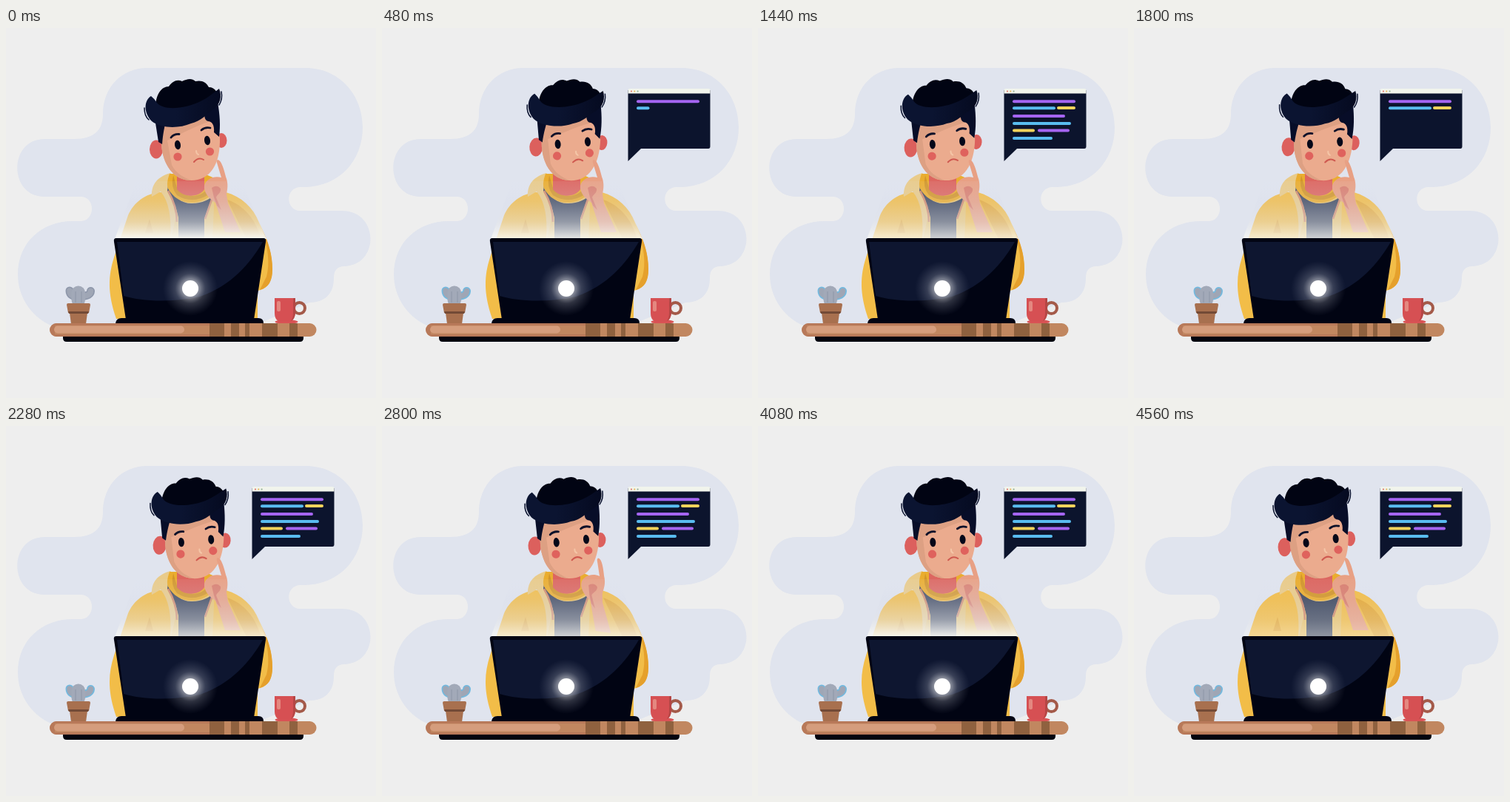
Recreate the animation shown at these times as an HTML page. Size 500 by 500 pixels, loop 4800 ms.

```html
<!DOCTYPE html>
<html lang="en">
<head>
<meta charset="utf-8">
<title>Thinking at the laptop</title>
<style>
  html, body { margin: 0; width: 100%; height: 100%; overflow: hidden; background: #eee; }
  svg { display: block; width: 100vw; height: 100vh; }
</style>
</head>
<body>
<svg viewBox="0 0 500 500">
  <defs>
    <linearGradient id="beamFill" x1="0" y1="0" x2="0" y2="1">
      <stop offset="0" stop-color="#e0e6f4" stop-opacity=".08"/>
      <stop offset=".35" stop-color="#d8dcea" stop-opacity=".26"/>
      <stop offset=".7" stop-color="#e4e6ea" stop-opacity=".56"/>
      <stop offset="1" stop-color="#fafaf6" stop-opacity=".98"/>
    </linearGradient>
    <radialGradient id="haloFill">
      <stop offset=".25" stop-color="#fff" stop-opacity=".62"/>
      <stop offset=".55" stop-color="#c6cad6" stop-opacity=".24"/>
      <stop offset="1" stop-color="#8f96ad" stop-opacity="0"/>
    </radialGradient>
    <linearGradient id="quiffFill">
      <stop offset=".4" stop-color="#0b1431"/>
      <stop offset="1" stop-color="#050a20"/>
    </linearGradient>
    <path id="face" d="M207 128L210 158C212 184 226 206 250 206C276 206 290 184 289 148L282 104L215 116Z"/>
    <clipPath id="faceClip"><use href="#face"/></clipPath>
    <path id="branches" d="M86 355Q86 363 98 363M114.500 355.500Q114 363 98 363"/>
  </defs>

  <rect width="500" height="500" fill="#eee"/>
  <path fill="#e0e4ee" d="M190 54H405C450 54 482 90 482 134C482 180 450 214 404 215H398C377 215 377 247 398 247H454C505 247 505 322 456 322C447 323 443 328 443 338C443 360 430 371 410 371L330 404H66C38 394 16 367 16 333C16 290 48 261 90 261H101C121 260 121 228 101 228H52C3 228 3 150 52 150H92C119 150 131 138 131 116C131 80 157 54 190 54Z"/>

  <!-- jacket, neck and shirt -->
  <path fill="#f2bd48" d="M205 222C184 226 170 239 164 256L146 310C138 335 137 358 149 393H340V355C353 353 360 342 360 326C360 305 353 285 342 263C334 242 318 228 297 222Z"/>
  <path fill="#e5a02c" d="M346 273C354 296 357 318 352 336L343 354C355 351 360 342 360 326C360 307 355 289 346 273Z"/>
  <path fill="#e5a937" d="M194 258L188 277H199ZM299 232L325 285H345C337 258 322 240 299 232Z"/>
  <path fill="#e9cb8a" d="M197 228C196 211 205 201 222 196L232 206L221 222L232 256V285H222Q225 240 209 221Z"/>
  <path fill="#e9c46f" d="M222 216L282 222L279 285H223L230 254Z"/>
  <path fill="#3f4960" d="M219 213C226 230 240 238 252 237C265 237 276 231 279 227L268 258V285H233V256Q229 236 218 220Z"/>
  <path fill="none" stroke="#d08a6c" stroke-width="2.600" d="M219 220Q231 241 231 262M278 232L269 258"/>
  <path fill="#eaad2f" d="M221 197C218 205 217 213 219 217C226 230 239 237 253 236C265 235 276 229 280 222L282 203L268 197Z"/>
  <path fill="#d2962b" d="M226 199L231 216C240 229 259 231 271 219L274 225Q252 239 231 226Q222 215 226 199Z"/>
  <path fill="#dc6660" d="M231 196H268V218C261 229 240 230 231 218Z"/>

  <g id="head">
    <ellipse cx="203" cy="164" rx="9" ry="12.500" fill="#dc605d"/>
    <ellipse cx="291" cy="152" rx="7.500" ry="10" fill="#dc605d"/>
    <use href="#face" fill="#ebab8e"/>
    <path clip-path="url(#faceClip)" fill="#dda083" d="M205 115H290V122C260 129 238 143 218 152L224 185C230 197 240 202 251 206L220 210L205 180Z"/>
    <path fill="#070d28" d="M201 122H217C214 134 212 143 211 157L206 154ZM268 116L286 100C289 117 290 132 288 147L281 141C282 131 278 126 273 126Q268 125 268 116Z"/>
    <path fill="#010413" d="M202 108C202 90 210 79 220 79C225 72 231 69 238 72C244 69 251 67 256 72C264 70 271 73 274 80C283 80 288 88 286 100L263 114L215 119Z"/>
    <path fill="url(#quiffFill)" d="M196 92C187 97 185 114 197 126C210 136 234 136 250 129C264 126 271 116 280 110C290 103 292 92 288 82C280 88 273 94 265 98C240 111 211 111 204 101Q200 95 196 92Z"/>
    <path fill="none" stroke="#09112d" stroke-width="1.500" stroke-linecap="round" d="M187 108Q187 119 193 124M291 86Q293 96 288 104"/>
    <g fill="#040819">
      <ellipse class="eye" cx="232" cy="158" rx="4" ry="6.2" transform="rotate(-8 232 158)"/>
      <ellipse class="eye" cx="272" cy="152" rx="4" ry="6.2" transform="rotate(-8 272 152)"/>
    </g>
    <g fill="none" stroke="#0a1029" stroke-width="2.800" stroke-linecap="round">
      <path d="M223 148Q227 143 234 143.500"/>
      <path d="M264 138Q269 133.500 276 135"/>
    </g>
    <circle cx="232" cy="174" r="5.6" fill="#df625d"/>
    <circle cx="275.5" cy="167" r="5.6" fill="#df625d"/>
    <path fill="none" stroke="#f4c5a7" stroke-width="2" stroke-linecap="round" d="M257 166Q257 170 260 171"/>
    <path fill="none" stroke="#cf5950" stroke-width="2" stroke-linecap="round" d="M254 181Q260 174 267 178"/>
  </g>

  <g id="hand">
    <path fill="#e8a084" d="M286 178C291 179 294 189 297 201C301 211 299 218 298 225L300 237L317 276H296L283 236C273 230 267 221 268 213C270 204 281 199 291 202L285 182Q284 179 286 178Z"/>
    <path fill="#d97f70" d="M278 216Q285 211 290 217C291 223 285 225 284 229L291 246L285 240L281 229Z"/>
  </g>
  <path id="beam" fill="url(#beamFill)" d="M176 207H318L352 285H147Z"/>

  <!-- laptop -->
  <path fill="#010413" d="M149 284H348Q352 284 351 289L335 394H162L146 289Q145 284 149 284Z"/>
  <path fill="#0e1630" d="M150 289H347C330 318 305 348 262 363C224 371 185 370 159 362Z"/>
  <path fill="#010413" d="M148 399Q149 392 156 392H341Q348 392 348 399Z"/>
  <circle id="halo" cx="249" cy="352" r="37" fill="url(#haloFill)"/>
  <circle cx="249" cy="352" r="11" fill="#fff"/>

  <!-- plant -->
  <g fill="none" stroke-linecap="round">
    <use id="arms" href="#branches" stroke-width="11"/>
    <use href="#branches" stroke="#9fa6b5" stroke-width="7.500"/>
  </g>
  <rect x="88.500" y="348.500" width="18.500" height="28" rx="9" fill="#a2a9b8"/>
  <path stroke="#8d95a7" stroke-width="1" d="M94 356V371M102 356V371"/>
  <path fill="#a8704f" d="M84 372H112Q114 372 114 374L112 385H110L108 400H88L86 385H84L82 374Q82 372 84 372Z"/>
  <path fill="#734a36" d="M84 383H112L111 386H85Z"/>

  <!-- mug -->
  <circle cx="396.500" cy="378.500" r="7.500" fill="none" stroke="#a45a49" stroke-width="4"/>
  <ellipse cx="379" cy="397" rx="15.500" ry="3" fill="#d95355"/>
  <path fill="#d65053" d="M363 365H391V385Q390 397 381 397H373Q363 397 363 385Z"/>
  <path fill="#b54645" d="M388 365H391V385Q390 394 385 396Q388 392 388 385Z"/>
  <rect x="366" y="369" width="5" height="14" rx="2" fill="#e48880"/>

  <!-- desk -->
  <path fill="#02040f" d="M77 415H402V419Q402 424 397 424H82Q77 424 77 419Z"/>
  <rect x="59.500" y="399" width="360" height="18" rx="9" fill="#c18760"/>
  <path fill="#b87959" d="M68 399H275V402H66V414H275V417H68A9 9 0 0 1 68 399Z"/>
  <rect x="65" y="402.500" width="176" height="10" rx="5" fill="#d59d7d"/>
  <path fill="#8f613f" d="M275 399H295V417H275ZM304 399H315V417H304ZM323 399H329V417H323ZM346 399H367V417H346ZM383 399H394V417H383Z"/>

  <g id="bubble">
    <path fill="#0c142d" d="M332.500 84H443.500V160Q443.500 163 441 163H350L332.500 180Z"/>
    <path fill="#f1f4ec" d="M332.500 88.500V84Q332.500 82 335 82H441Q443.500 82 443.500 84V88.500Z"/>
    <circle cx="337" cy="85.500" r="1.100" fill="#e0776b"/>
    <circle cx="341.300" cy="85.500" r="1.100" fill="#e7b552"/>
    <circle cx="345.600" cy="85.500" r="1.100" fill="#8fae92"/>
    <g id="code" stroke-width="4" stroke-linecap="round"></g>
  </g>
</svg>
<script>
const LOOP = 4800, STEP = 40, LAST = 4560, TYPE_MS = 80;
const $ = id => document.getElementById(id);
const clamp = v => Math.max(0, Math.min(1, v));

const PURPLE = '#a565f2', BLUE = '#59bcf0', YELLOW = '#f3d35b';
const strokes = [
  [346, 427, 99.3, PURPLE],
  [346, 400, 108.3, BLUE], [406, 427, 108, YELLOW],
  [346, 413, 119, PURPLE],
  [346, 421, 129, BLUE],
  [346, 372, 138.5, YELLOW], [380, 419, 138.5, PURPLE],
  [346, 396, 149, BLUE]
].map(([x1, x2, y, color]) => {
  const el = document.createElementNS('http://www.w3.org/2000/svg', 'line');
  const attrs = { x1, x2, y1: y, y2: y, stroke: color };
  for (const k in attrs) el.setAttribute(k, attrs[k]);
  $('code').append(el);
  return { el, x1, x2 };
});
const eyes = [...document.querySelectorAll('.eye')];

const tilt = [[0, 0], [420, 4], [1000, .7], [1800, 4.1], [2800, 2.6], [3440, 3], [4080, 3], [4560, .4]];
const light = [[0, 1], [1040, .8], [1800, .8], [2800, .8], [3440, .9], [4080, .97], [4560, .45]];
const typing = [380, 1560, 3440];
const taps = [1040, 2800];

// Cosine-eased value between keyed poses.
function ease(keys, t) {
  const i = keys.findIndex(k => k[0] > t);
  if (i < 0) return keys[keys.length - 1][1];
  const [t0, a] = keys[i - 1], [t1, b] = keys[i];
  return a + (b - a) * (1 - Math.cos(Math.PI * (t - t0) / (t1 - t0))) / 2;
}

function bump(t, center, half) {
  const d = Math.abs(t - center) / half;
  return d < 1 ? (1 + Math.cos(Math.PI * d)) / 2 : 0;
}

function backOut(p) {
  const s = .95, q = p - 1;
  return 1 + (s + 1) * q * q * q + s * q * q;
}

function draw(ms) {
  const t = Math.min(LAST, Math.floor(ms % LOOP / STEP) * STEP);

  $('head').setAttribute('transform', `rotate(${ease(tilt, t)} 250 240)`);
  const tap = taps.reduce((sum, c) => sum + bump(t, c, 280), 0);
  $('hand').setAttribute('transform', `rotate(${tap * 8} 286 224)`);
  const open = 1 - .9 * bump(t, 1080, 90);
  eyes.forEach(e => e.setAttribute('ry', 6.2 * open));

  const glow = ease(light, t);
  $('beam').setAttribute('opacity', glow);
  $('halo').setAttribute('opacity', .7 + .3 * glow);

  const size = t ? backOut(clamp(t / 440)) : 0;
  $('bubble').setAttribute('transform', `translate(333 180) scale(${size}) translate(-333 -180)`);

  const start = typing.filter(s => s - STEP <= t).pop() ?? LOOP;
  strokes.forEach(({ el, x1, x2 }, i) => {
    const p = clamp((t - start) / TYPE_MS - i);
    el.setAttribute('x2', x1 + (x2 - x1) * p);
    el.setAttribute('visibility', p > 0 ? 'inherit' : 'hidden');
  });
  $('arms').setAttribute('stroke', t > start + TYPE_MS ? '#72b9df' : '#8e97aa');
}

const begin = performance.now();
function tick() {
  draw(performance.now() - begin);
  requestAnimationFrame(tick);
}
tick();
</script>
</body>
</html>
```
